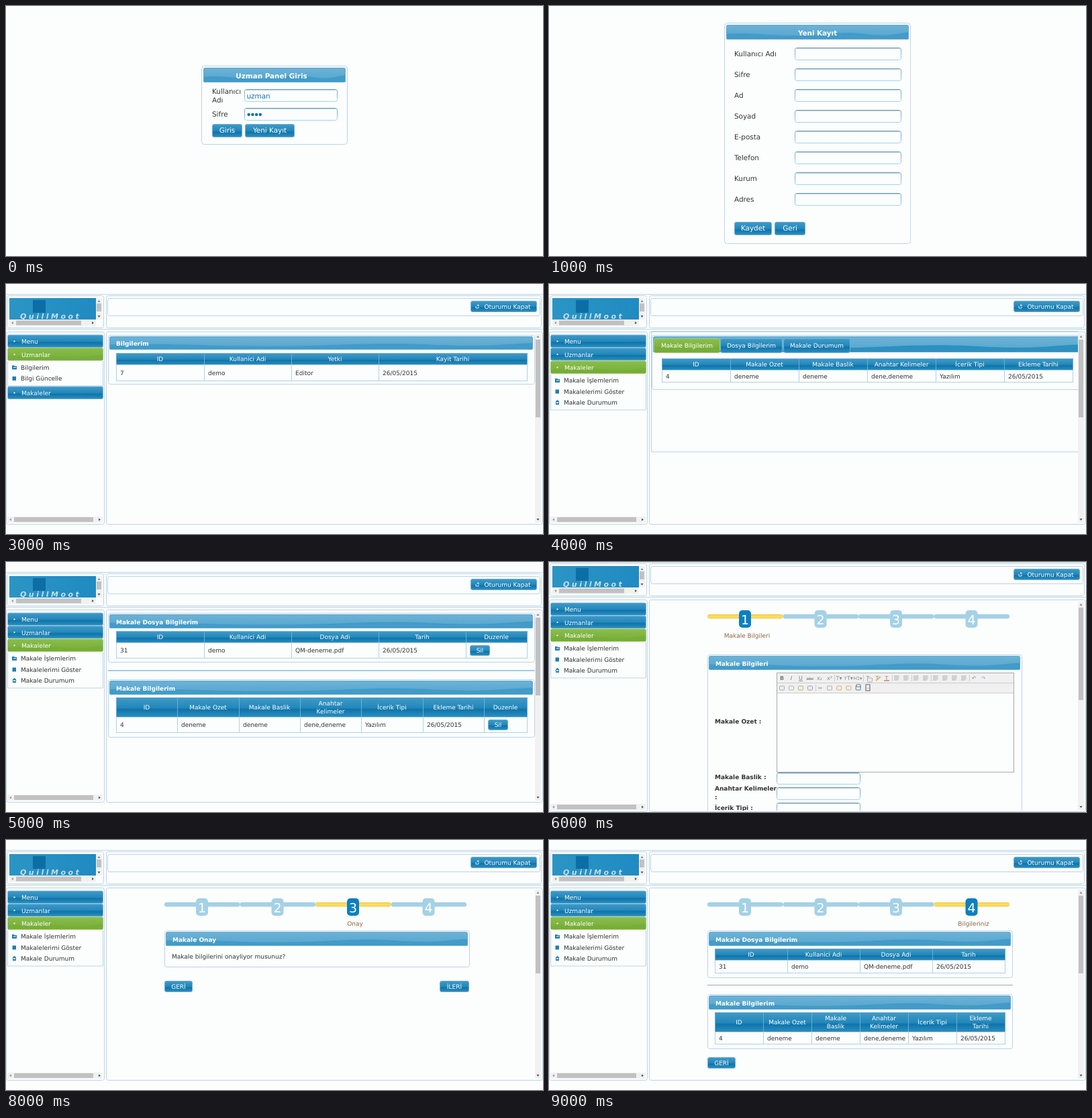
These frames come from a looping animation (800 by 373 pixels, 10 s). An HTML page:

```html
<!DOCTYPE html>
<html lang="tr">
<head>
<meta charset="utf-8">
<title>Panel</title>
<style>
html, body { margin: 0; width: 100%; height: 100%; overflow: hidden; background: #fcfdfd; }
svg { display: block; width: 100%; height: 100%; }
text { font-family: "DejaVu Sans", sans-serif; font-size: 9px; fill: #333; text-rendering: geometricPrecision; white-space: pre; }
.b { font-weight: bold; }
.w { fill: #fff; }
.m { text-anchor: middle; }
.big { font-size: 10.4px; }
.num { font-size: 19px; }
</style>
</head>
<body>
<svg id="stage" viewBox="0 0 800 373" xmlns="http://www.w3.org/2000/svg">
<defs>
<linearGradient id="glass" x2="0" y2="1">
<stop offset="0" stop-color="#3f9ac8"/><stop offset=".52" stop-color="#2387b9"/>
<stop offset=".6" stop-color="#0d74ab"/><stop offset="1" stop-color="#2d8fc0"/>
</linearGradient>
<linearGradient id="green" x2="0" y2="1">
<stop offset="0" stop-color="#8bbd4d"/><stop offset="1" stop-color="#74ad35"/>
</linearGradient>
<linearGradient id="light" x2="0" y2="1">
<stop offset="0" stop-color="#6db2d6"/><stop offset="1" stop-color="#54a5ce"/>
</linearGradient>
<linearGradient id="yellow" x2="0" y2="1">
<stop offset="0" stop-color="#f3cd45"/><stop offset=".5" stop-color="#fbdf66"/><stop offset="1" stop-color="#f3cf4a"/>
</linearGradient>
<linearGradient id="field" x2="0" y2="1">
<stop offset="0" stop-color="#6e9fb8"/><stop offset="1" stop-color="#9ed6ef"/>
</linearGradient>
<linearGradient id="logo"><stop offset="0" stop-color="#2b95c5"/><stop offset="1" stop-color="#1f8bc1"/></linearGradient>
<clipPath id="body"><path d="M0 0H788V371H0z"/></clipPath>
</defs>
</svg>
<script>
const LINE = '#b9d5e6';

const rect = (x, y, w, h, fill, r = 0, more = '') =>
  `<rect x="${x}" y="${y}" width="${w}" height="${h}" rx="${r}" fill="${fill}" ${more}/>`;
const path = (d, fill, stroke = 'none', width = 1) =>
  `<path d="${d}" fill="${fill}" stroke="${stroke}" stroke-width="${width}"/>`;
const text = (x, y, s, cls = '', more = '') => `<text x="${x}" y="${y}" class="${cls}" ${more}>${s}</text>`;

// Outlined box given by its edges
const box = (l, t, r, b, radius = 3, stroke = LINE, fill = 'none') =>
  rect(l + .5, t + .5, r - l - 1, b - t - 1, fill, radius, `stroke="${stroke}"`);

const button = (l, t, r, b, label, cls = '', tx = (l + r) / 2) =>
  box(l, t, r, b, 2.5, '#6fb0d6', 'url(#glass)') +
  text(tx, (t + b) / 2 + 3.4, label, `w m ${cls}`);

const field = (l, t, r, b) => box(l, t, r, b, 3, 'url(#field)', '#fcfdfd') +
  path(`M${l + 3} ${t + 1}H${r - 3}`, 'none', '#709fb8');

// Title bar with a darker wave along its lower half
function waveBar(l, t, r, b, radius = 3, dark = '#429bc8') {
  const w = r - l, h = b - t, c = radius;
  const wave = `M${l} ${t + h * .62}C${l + w * .16} ${t + h * .5} ${l + w * .24} ${t + h * .78} ${l + w * .4} ${t + h * .74}` +
    `S${l + w * .62} ${t + h * .42} ${l + w * .76} ${t + h * .62}S${l + w * .92} ${t + h * .6} ${r} ${t + h * .5}` +
    `V${b - c}q0 ${c} ${-c} ${c}H${l + c}q${-c} 0 ${-c} ${-c}z`;
  return rect(l, t, w, h, 'url(#light)', c) + path(wave, dark) + box(l, t, r, b, c, '#5fa8ce');
}

const panel = (l, t, r, b, title, headHeight = 21) =>
  box(l, t, r, b) + waveBar(l + 2, t + 2, r - 3, t + 2 + headHeight) +
  text(l + 12, t + headHeight / 2 + 6, title, 'b w');

// Each column is [left edge, heading, value]; a heading may hold a line break
function table(cols, right, top, mid, bottom) {
  return cols.map(([x, head, value], i) => {
    const end = i + 1 < cols.length ? cols[i + 1][0] : right;
    const lines = head.split('|'), centre = (top + mid) / 2 + 3.2;
    return box(x, top, end + 1, mid, 0, '#68afd7', 'url(#glass)') +
      lines.map((s, k) => text((x + end) / 2, centre + (k - (lines.length - 1) / 2) * 12, s, 'w m')).join('') +
      box(x, mid - 1, end + 1, bottom, 0, '#acd3e8') +
      (value === 'Sil' ? button(x + 6, mid + 3, x + 36, bottom - 4, 'Sil')
        : text(x + 6, (mid + bottom) / 2 + 2.8, value));
  }).join('');
}

const arrow = (x, y, dx, dy, color = '#555') =>
  path(`M${x + dx * 2} ${y + dy * 2}L${x - dx - dy * 2} ${y - dy - dx * 2}L${x - dx + dy * 2} ${y - dy + dx * 2}z`, color);

const hScroll = (l, r, y, a, b) => rect(l, y, r - l, 9, '#f1f1f1') + rect(a, y + 1, b - a, 7, '#c1c1c1') +
  arrow(l + 5, y + 4.5, -1, 0, '#999') + arrow(r - 5, y + 4.5, 1, 0);
const vScroll = (x, t, b, a, z) => rect(x, t, 9, b - t, '#f1f1f1') + rect(x + 1, a, 7, z - a, '#c1c1c1') +
  arrow(x + 4.5, t + 5, 0, -1, '#888') + arrow(x + 4.5, b - 5, 0, 1);

const menus = [
  ['Menu', []],
  ['Uzmanlar', ['Bilgilerim', 'Bilgi Güncelle']],
  ['Makaleler', ['Makale İşlemlerim', 'Makalelerimi Göster', 'Makale Durumum']]
];
const menuIcons = [
  (x, y) => path(`M${x} ${y - 3}h3l1 1h3v5h-7z`, '#1f7fae') + path(`M${x + 2} ${y}h4`, 'none', '#fff'),
  (x, y) => rect(x + 1, y - 3, 5, 6, '#1f7fae') + path(`M${x + .5} ${y - 3}v6`, 'none', '#8abfd9'),
  (x, y) => path(`M${x + 1} ${y - 2}l2.5-2 2.5 2v5h-5z`, '#1f7fae') + rect(x + 2, y - 1, 3, 2, '#fff')
];

function sideMenu(y, open) {
  let out = '';
  menus.forEach(([name, items], i) => {
    const on = i === open;
    out += box(2, y - .5, 145, y + 19, 2, on ? '#9fca6c' : '#7dbcdd', `url(#${on ? 'green' : 'glass'})`) +
      (on ? path(`M3 ${y + 13}q50 -3 80 0t61 -3v8H3z`, '#76ae38') : '') +
      arrow(12.5, y + 9.5, on ? 0 : .8, on ? .8 : 0, '#fff') + text(23, y + 13, name, 'w');
    y += 19.5;
    if (!on) return;
    const height = items.length * 16.5 + 4;
    out += path(`M2.5 ${y}v${height}h142v${-height}`, 'none', LINE);
    items.forEach((item, k) => {
      const cy = y + 9.5 + k * 16.5;
      out += menuIcons[k](9, cy) + text(22, cy + 3.3, item);
    });
    y += height + 1;
  });
  return out;
}

function page(content, open = 2, top = 15, bottom = 359) {
  const head =
    box(-2, 0, 802, 53) + box(1, 2, 146, 51) + box(149, 2, 798, 51) + box(151, 6, 796, 33) +
    rect(5, 6, 129, 32, 'url(#logo)') + rect(40, 9, 19, 19, '#0d6ea5') +
    text(21, 37, 'QuillMoot', '', 'style="font-size:11px;font-style:oblique;font-weight:bold;letter-spacing:3.5px;fill:#c3dfed"') +
    vScroll(134, 6, 38, 14, 26) + hScroll(5, 134, 38.5, 15, 112) +
    button(692, 10, 791, 27, 'Oturumu Kapat', '', 747) +
    path('M700 18v3h4v-2M702 18l2-2m-2 0h2v2', 'none', '#d4eaf5');
  return `<g transform="translate(0 ${top})">${head}</g>` +
    box(0, top + 56, 147, bottom) + sideMenu(top + 61, open) + hScroll(2, 144, bottom - 12, 12, 130) +
    box(149, top + 56, 800, bottom) + vScroll(788, top + 59, bottom - 3, top + 68, top === 15 ? 199 : 206) +
    `<g clip-path="url(#body)">${content}</g>`;
}

function steps(active, y, caption) {
  let out = '';
  for (let i = 0; i < 4; i++) {
    const x = 236 + i * 112.5, on = i + 1 === active;
    out += rect(x, y, 112.5, 6.5, on ? 'url(#yellow)' : '#a4d1e6', 3) +
      rect(x + 47, y - 6, 18, 26, on ? '#0b80c2' : '#a4d1e6', 5) +
      text(x + 56, y + 15, i + 1, 'w m num');
    if (on) out += text(x + 59, y + 35, caption, 'm', 'style="fill:#8a6842"');
  }
  return out;
}

function login() {
  let dots = '';
  for (let i = 0; i < 4; i++) dots += `<circle cx="${361.7 + i * 5.7}" cy="162" r="2.2" fill="#0e72a4"/>`;
  return box(291, 89, 509, 207, 4) + waveBar(294, 92, 506, 114) +
    text(395.5, 108, 'Uzman Panel Giris', 'b w m big') +
    text(307, 131, 'Kullanıcı', 'big') + text(307, 144, 'Adı', 'big') + text(307, 165, 'Sifre', 'big') +
    field(355, 124, 494, 143) + field(355, 152, 494, 171) +
    text(358.5, 138, 'uzman', 'big', 'style="fill:#0e72a4"') + dots +
    button(307, 176, 352, 196, 'Giris', 'big') + button(356, 176, 430, 196, 'Yeni Kayıt', 'big');
}

function register() {
  const labels = ['Kullanıcı Adı', 'Sifre', 'Ad', 'Soyad', 'E-posta', 'Telefon', 'Kurum', 'Adres'];
  return box(261, 25, 539, 355, 4) + waveBar(264, 28, 536, 50) + text(400, 44, 'Yeni Kayıt', 'b w m big') +
    labels.map((s, i) => text(276, 75 + i * 31, s, 'big') + field(366, 62 + i * 31, 525, 81 + i * 31)).join('') +
    button(276, 322, 332, 342, 'Kaydet', 'big') + button(336, 322, 382, 342, 'Geri', 'big');
}

function home() {
  const pill = (l, t, w, first, second) => {
    const shaded = (y, s, color) => text(l + w / 2 + 1, y + 1, s, 'm', 'style="fill:#777"') +
      text(l + w / 2, y, s, 'm', `style="fill:${color}"`);
    return rect(l, t, w, 8.5, '#292929', 4.2) + shaded(t + 9, first, '#fff') +
      (second ? shaded(t + 18, second, '#eee') : '');
  };
  const sheet = path('M758 159l5-5h14v26h-19z', '#fafafa', '#b9bec1', 1.5) + path('M758 159h5v-5', 'none', '#8e9498') +
    path('M762 159h12M762 162h10', 'none', '#3994cc') + path('M761 166h6M761 170h5M761 174h7', 'none', '#ccc') +
    path('M765 168l11 9', 'none', '#f5a933', 4) + path('M763 166.500l2.500 2', 'none', '#dc5a3c', 4) +
    path('M777.500 175l2.500 6-5.500-2z', '#e9c9a0');
  const clipboard = rect(752, 189, 20, 25, '#fafafa', 2, 'stroke="#a8adb0" stroke-width="2"') +
    path('M757 192v-4h3q2-4 4 0h3v4z', '#f8c252', '#e89f2c') + path('M762 200v7M758.5 203.5h7', 'none', '#df3d35', 1.6);
  let stack = '';
  for (let i = 3; i >= 0; i--)
    stack += path(`M745 ${233 + i * 4}l5-9h18l5 9z`, '#fafafa', ['#b5b9bb', '#4aa0d5', '#f2a33b', '#4aa0d5'][i], 1.3);
  stack += path('M753 223l4 4 9-8', 'none', '#df3d35', 1.6);
  let rings = '';
  for (let y = 253; y < 280; y += 4) rings += path(`M744 ${y}h4`, 'none', '#d3ad55', 1.3);
  const notebook = rect(745, 249.5, 23, 30, '#3b3d3f', 2) + rect(768, 253, 2.5, 5, '#409bd0') + rect(768, 261, 2.5, 5, '#d7443a') +
    path('M753 257h10M753 260h8', 'none', '#ddd') + rings;
  const house = path('M749 296v10l9 4 8-4v-10l-8-7z', '#eeeae2', '#d5cfc4') + path('M745 296l9-12 12 8 1 5-5-3-6-4-8 8z', '#f7b341') +
    rect(761, 283, 3, 6, '#d98b23') + path('M751 300l5 2v6l-5-2z', '#eba33a') + rect(759, 299, 4, 4, '#f0b552');
  let weave = '';
  for (let x = 736; x < 774; x += 3) weave += path(`M${x} 325v16`, 'none', '#adadad');
  const basket = path('M732 323h43l-3 19h-37z', '#999') + weave + path('M735 331h37M735 336h37', 'none', '#8d8d8d') +
    rect(731, 320, 45, 4, '#777', 1) + path('M734 322h38', 'none', '#bbb');
  return text(152, 84, 'Hosgeldin, demo') +
    pill(682, 163, 66, 'Makalelerim') + pill(682, 195, 59, 'Dosya', 'Islemlerim') +
    pill(678, 227, 60, 'Makale', 'Islemlerim') + pill(682, 259.5, 54, 'Bilgilerim') + pill(682, 291.5, 53, 'Anasayfa') +
    sheet + clipboard + stack + notebook + house + basket;
}

const profile = () => panel(152, 76, 788, 150, 'Bilgilerim', 20) +
  table([[164, 'ID', '7'], [295, 'Kullanici Adi', 'demo'], [425, 'Yetki', 'Editor'],
    [555, 'Kayit Tarihi', '26/05/2015']], 776, 103, 121, 145);

function articleTabs() {
  const tab = (l, r, label, on) => box(l, 81, r, 103, 3, on ? '#a5cc75' : '#6fb3d8', `url(#${on ? 'green' : 'glass'})`) +
    (on ? path(`M${l + 1} 95q35 -3 55 0t${r - l - 57} -2v9H${l + 1}z`, '#76ae38') : '') +
    text((l + r) / 2, 95, label, 'w m');
  return box(152, 70, 792, 251, 0) + box(153, 76, 792, 158) + waveBar(155, 78, 792, 102, 3, '#2c90c0') +
    tab(156, 255, 'Makale Bilgilerim', true) + tab(255, 348, 'Dosya Bilgilerim') + tab(349, 449, 'Makale Durumum') +
    table([[168, 'ID', '4'], [270, 'Makale Ozet', 'deneme'], [372, 'Makale Baslik', 'deneme'],
      [474, 'Anahtar Kelimeler', 'dene,deneme'], [576, 'İcerik Tipi', 'Yazılım'], [678, 'Ekleme Tarihi', '26/05/2015']],
    780, 111, 129, 147);
}

const articleLists = () => panel(152, 76, 788, 150, 'Makale Dosya Bilgilerim') +
  table([[164, 'ID', '31'], [295, 'Kullanici Adi', 'demo'], [425, 'Dosya Adi', 'QM-deneme.pdf'],
    [555, 'Tarih', '26/05/2015'], [685, 'Duzenle', 'Sil']], 776, 103, 121, 144) +
  path('M152 162h636', 'none', '#79c2e6', 1.3) + panel(152, 175, 788, 262, 'Makale Bilgilerim') +
  table([[164, 'ID', '4'], [255, 'Makale Ozet', 'deneme'], [347, 'Makale Baslik', 'deneme'],
    [438, 'Anahtar|Kelimeler', 'dene,deneme'], [529, 'İcerik Tipi', 'Yazılım'],
    [621, 'Ekleme Tarihi', '26/05/2015'], [712, 'Duzenle', 'Sil']], 776, 202, 232, 255);

function editor() {
  const glyph = (x, y, s, color = '#888', more = '') => text(x, y, s, 'm', `style="fill:${color};font-size:8px;${more}"`);
  const lines = (x, y) => path(`M${x - 4} ${y - 3}h8m-8 2h7m-7 2h8m-8 2h6`, 'none', '#aaa', .9);
  const mini = (x, y, color) => rect(x - 3.5, y - 3, 7, 6, '#eee', 1, `stroke="${color}" stroke-width=".9"`);
  let tools = glyph(347, 176, 'B', '#777', 'font-weight:bold') + glyph(361, 176, 'I', '#777', 'font-style:oblique') +
    glyph(375, 176, 'U', '#777', 'text-decoration:underline') + glyph(389, 176, 'abc', '#777', 'font-size:6px;text-decoration:line-through') +
    glyph(403, 176, 'x₂') + glyph(418, 176, 'x²') + glyph(432, 176, 'T▾') + glyph(446, 176, 'тT▾') + glyph(460, 176, 'H1▾', '#888', 'font-size:7px') +
    glyph(475, 176, 'T') + mini(478, 176, '#aaa') + glyph(489, 176, 'T') + path('M487 177l7-6', 'none', '#e9ba49', 2) +
    glyph(503, 176, 'T') + path('M499 177h8', 'none', '#dd7777', 1.5);
  for (const x of [518, 532, 547, 561, 576, 590, 604, 618]) tools += lines(x, 173);
  tools += glyph(633, 176, '↶', '#6d9bc6') + glyph(647, 176, '↷', '#7ab6d3');
  ['#90a7bc', '#a8bd91', '#b9b25a', '#999'].forEach((c, i) => tools += mini(347 + i * 14, 188, c));
  tools += glyph(404, 191, '✂');
  ['#aaa', '#d7ac55', '#d7ac55', '#38739f'].forEach((c, i) => tools += mini(418 + i * 14.2, 188, c));
  tools += rect(458, 183, 6, 3, '#fff', 0, 'stroke="#555" stroke-width=".8"') + rect(472, 183, 6, 9, '#fff', 0, 'stroke="#444" stroke-width=".9"') +
    glyph(475, 190, '‹›', '#c33', 'font-size:6px');
  for (const x of [425, 468, 511, 540, 569, 626]) tools += path(`M${x + .5} 168v10`, 'none', '#ccc');
  tools += path('M397.5 183v10', 'none', '#ccc');
  return steps(1, 78, 'Makale Bilgileri') + panel(236, 138, 705, 390, 'Makale Bilgileri', 21) +
    box(339, 165, 693, 314, 0, '#aaa', '#fcfdfd') + rect(340, 166, 352, 30, '#f0f0f0') +
    path('M340 180.5h352M340 195.5h352', 'none', '#ccc') + tools +
    text(247, 241, 'Makale Ozet :', 'b') + text(247, 324, 'Makale Baslik :', 'b') +
    text(247, 341, 'Anahtar Kelimeler', 'b') + text(247, 354, ':', 'b') + text(247, 370, 'İcerik Tipi :', 'b') +
    field(339, 314, 464, 332) + field(339, 336, 464, 355) + field(339, 359, 464, 377);
}

const upload = () => steps(2, 93, 'Dosya Bilgileri') + panel(236, 135, 691, 208, 'Dosya Yükleme') +
  box(247, 162, 680, 201) + waveBar(247, 162, 680, 185) +
  button(251, 165, 314, 182, 'Choose', '', 287) + path('M259 174h5M261.5 171.5v5', 'none', '#fff', 1.5) +
  `<g opacity=".35">${button(315, 165, 376, 182, 'Upload', '', 350)}${button(377, 165, 437, 182, 'Cancel', '', 411.5)}` +
  path('M324 177v-2l3-3m-2 0h2v2', 'none', '#fff') + '<circle cx="387" cy="174" r="2" fill="none" stroke="#fff"/></g>' +
  button(236, 232, 278, 249, 'GERİ') + button(646, 232, 690, 249, 'İLERİ');

const approval = () => steps(3, 93, 'Onay') + panel(236, 135, 691, 190, 'Makale Onay') +
  text(247, 177, 'Makale bilgilerini onayliyor musunuz?') +
  button(236, 210, 278, 227, 'GERİ') + button(646, 210, 690, 227, 'İLERİ');

const summary = () => steps(4, 93, 'Bilgileriniz') + panel(236, 135, 691, 206, 'Makale Dosya Bilgilerim') +
  table([[247, 'ID', '31'], [355, 'Kullanici Adi', 'demo'], [463, 'Dosya Adi', 'QM-deneme.pdf'], [571, 'Tarih', '26/05/2015']],
    679, 162, 180, 199) +
  path('M236 216.5h455', 'none', '#a0a8ac') + panel(236, 230, 691, 312, 'Makale Bilgilerim') +
  table([[247, 'ID', '4'], [319, 'Makale Ozet', 'deneme'], [391, 'Makale|Baslik', 'deneme'], [463, 'Anahtar|Kelimeler', 'dene,deneme'],
    [535, 'İcerik Tipi', 'Yazılım'], [607, 'Ekleme|Tarihi', '26/05/2015']], 679, 257, 287, 305) +
  button(236, 324, 278, 341, 'GERİ');

const scenes = [
  login(), register(), page(home(), -1), page(profile(), 1), page(articleTabs()),
  page(articleLists()), page(editor(), 2, 0, 373), page(upload()), page(approval()), page(summary())
];
const stage = document.getElementById('stage');
stage.insertAdjacentHTML('beforeend', scenes.map(s => `<g class="scene" display="none">${s}</g>`).join(''));
const groups = [...stage.querySelectorAll('.scene')];

let shown = -1;
function draw() {
  const next = Math.floor(performance.now() / 1000) % groups.length;
  if (next !== shown) groups.forEach((g, i) => g.setAttribute('display', i === next ? 'inline' : 'none'));
  shown = next;
  requestAnimationFrame(draw);
}
draw();
</script>
</body>
</html>
```
